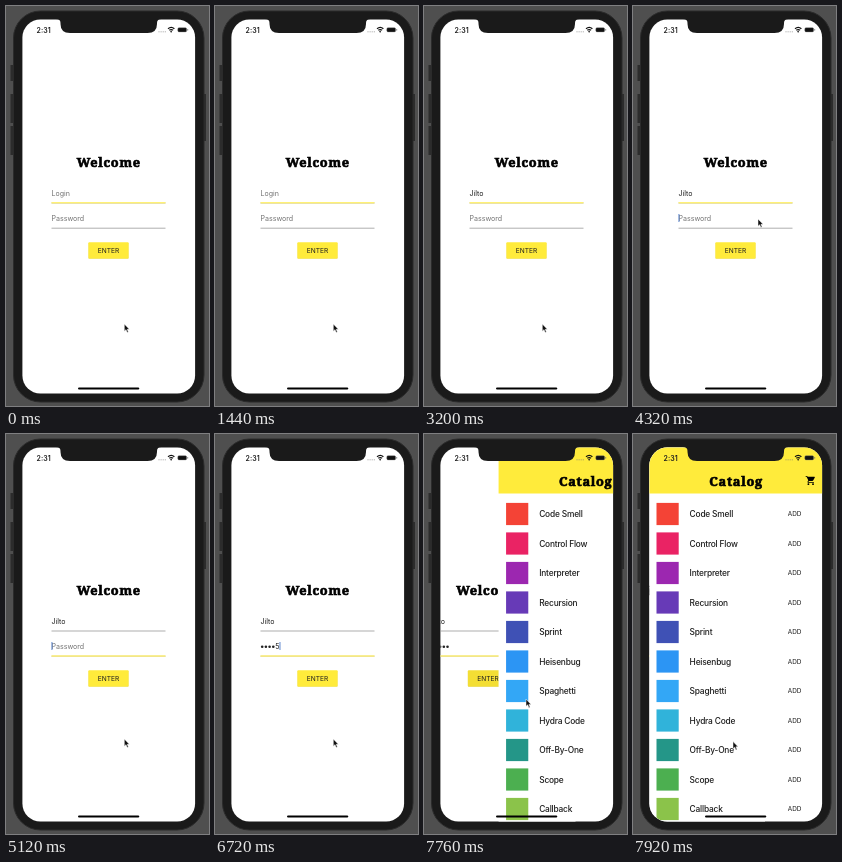
Write an HTML page that moves like this. It is 203 px wide and 400 px high and loops after 8 s.

```html
<!DOCTYPE html>
<html lang="en">
<head>
<meta charset="utf-8">
<title>Sign in</title>
<style>
  html, body { margin: 0; width: 100%; height: 100%; overflow: hidden; background: #4f4f4f; }
  svg { display: block; width: 203px; height: 400px; }
  text { font-family: Inter, Roboto, sans-serif; fill: #1e1e1e; }
  .title { font: 900 12.8px "Noto Serif", serif; letter-spacing: .7px; fill: #000; stroke: #000; stroke-width: .65px; text-anchor: middle; }
  .field { font-size: 7.1px; }
  .hint { font-size: 7.05px; fill: #727272; }
  .item { font-size: 8.4px; font-weight: 500; letter-spacing: -.2px; }
  .add { font-size: 6.4px; }
  .button { font-size: 6.6px; text-anchor: middle; }
</style>
</head>
<body>
<svg viewBox="0 0 203 400">
  <defs>
    <clipPath id="screen"><rect x="16.4" y="13.5" width="172.7" height="374.1" rx="18"/></clipPath>
  </defs>
  <path d="M4.5 59h4v16h-4zM4.5 88h4v29h-4zM4.5 120h4v29h-4zM196 88h4v47h-4z" fill="#2c2c2c"/>
  <rect x="7.5" y="5" width="190.5" height="391" rx="27" fill="#1a1a1a" stroke="#2b2b2b"/>

  <g clip-path="url(#screen)">
    <g id="login">
      <rect x="16" y="13" width="174" height="375" fill="#fff"/>
      <text class="title" x="102.7" y="160.7">Welcome</text>
      <text class="hint" id="loginHint" x="45.5" y="190">Login</text>
      <text class="field" id="name" x="45.5" y="190"></text>
      <path d="M45.5 197h114" stroke="#8c8c8c" stroke-width=".7"/>
      <path id="loginLine" d="M45.5 196.8h114" stroke="#fff176" stroke-width="1.4"/>
      <text class="hint" id="passHint" x="45.5" y="215">Password</text>
      <g id="dots"></g>
      <text class="field" id="digit" y="215"></text>
      <path d="M45.5 222.2h114" stroke="#8c8c8c" stroke-width=".7"/>
      <path id="passLine" d="M45.5 222h114" stroke="#fff176" stroke-width="1.4"/>
      <rect id="caret" width=".9" height="8" fill="#4a78c8"/>
      <rect x="82.3" y="237" width="40.4" height="16" rx="1" fill="#000" opacity=".1"/>
      <rect id="button" x="82.3" y="236.3" width="40.4" height="16.4" rx="1"/>
      <text class="button" x="102.5" y="246.9">ENTER</text>
    </g>
    <g id="catalog">
      <rect x="16" y="13" width="174" height="375" fill="#fff"/>
      <rect x="16" y="13" width="174" height="46.5" fill="#ffeb3b"/>
      <text class="title" x="103.1" y="51.7">Catalog</text>
      <path transform="translate(172.2 41) scale(.46)" d="M7 18c-1.1 0-2 .9-2 2s.9 2 2 2 2-.9 2-2-.9-2-2-2zM1 2v2h2l3.6 7.6-1.35 2.45C4.6 15.3 5.5 17 7 17h12v-2H7.4c-.2 0-.3-.2-.2-.4l.9-1.6h7.45c.75 0 1.4-.4 1.75-1l3.6-6.5c.3-.7-.1-1.5-.9-1.5H5.2l-.95-2zM17 18c-1.1 0-2 .9-2 2s.9 2 2 2 2-.9 2-2-.9-2-2-2z"/>
    </g>
    <text x="30.6" y="26.5" font-size="7" font-weight="600">2:31</text>
    <path d="M152.5 25.8h7.5" stroke="#777" stroke-width="1" stroke-dasharray="1 1.1" opacity=".7"/>
    <g fill="none" stroke="#111" stroke-width="1.2">
      <path d="M162 22.7q3.2-2.8 6.4 0M163.3 24.3q1.9-1.6 3.8 0"/>
      <circle cx="165.2" cy="25.5" r=".3"/>
    </g>
    <rect x="171.8" y="21.7" width="8.8" height="4.2" rx="1.2" fill="#111" stroke="#777" stroke-width=".4"/>
    <path d="M181.7 23v1.6" stroke="#777" stroke-width=".8"/>
    <rect x="72" y="381.4" width="61.3" height="2.2" rx="1.1"/>
  </g>
  <path d="M50 13q4.5 0 4.5 4v1q0 9 9.5 9h77.5q9.5 0 9.5-9v-1q0-4 4.5-4z" fill="#1a1a1a"/>
  <path id="mouse" d="M0 0v7.2l1.7-1.5 1.2 2.8 1.2-.5-1.2-2.7h2.2z" fill="#111" stroke="#fff" stroke-width=".5"/>
</svg>
<script>
const $ = id => document.getElementById(id);
const LOOP = 8000, STEP = 80, LEFT = 45.5, DOT = 3.7;
const NAME = "Jilto", NAME_TIMES = [2320, 2720, 2880, 3040, 3200];
const DIGITS = "12345", DIGIT_TIMES = [5600, 5760, 5920, 6160, 6400];
const FOCUS = 4320, MASK = 7120, PRESS = 7600;
const mouseKeys = [[3680, 118.3, 318], [4160, 125, 213], [4320, 125, 213], [4880, 118.3, 305],
  [6720, 118.3, 305], [7440, 102.7, 250.3], [7680, 102.7, 250.3], [7920, 100, 307.5]];
const items = [["Code Smell", "#f44336"], ["Control Flow", "#ea2364"], ["Interpreter", "#9c27b0"],
  ["Recursion", "#673ab7"], ["Sprint", "#3f51b5"], ["Heisenbug", "#2c95f4"], ["Spaghetti", "#33a7f6"],
  ["Hydra Code", "#30b3da"], ["Off-By-One", "#249688"], ["Scope", "#4caf50"], ["Callback", "#8bc34a"]];

$("catalog").innerHTML += items.map(([label, color], i) => {
  const y = 80 + i * 29.5;
  return `<rect x="23.5" y="${y - 11.1}" width="22.2" height="22.2" fill="${color}"/>
    <text class="item" x="56.6" y="${y + 3}">${label}</text>
    <text class="add" x="154.8" y="${y + 2.2}">ADD</text>`;
}).join("");
$("dots").innerHTML = [...DIGITS].map((_, i) =>
  `<circle cx="${LEFT + 1.7 + i * DOT}" cy="212.8" r="1.3" fill="#222"/>`).join("");

const clamp = v => Math.min(1, Math.max(0, v));
const typed = (times, t) => times.filter(time => t >= time).length;
const show = (id, on) => $(id).setAttribute("opacity", +on);
const move = (id, x, y = 0) => $(id).setAttribute("transform", `translate(${x} ${y})`);

function mouseAt(t) {
  let [, x, y] = mouseKeys[0];
  for (let i = 1; i < mouseKeys.length; i++) {
    const [start, x0, y0] = mouseKeys[i - 1], [end, x1, y1] = mouseKeys[i];
    if (t < start) break;
    const p = clamp((t - start) / (end - start)), e = p * p * (3 - 2 * p);
    x = x0 + (x1 - x0) * e;
    y = y0 + (y1 - y0) * e;
  }
  return [x, y];
}

function draw(t) {
  const letters = typed(NAME_TIMES, t), digits = typed(DIGIT_TIMES, t);
  const inPassword = t >= FOCUS, masked = t >= MASK;
  const focus = clamp((t - FOCUS) / 200);

  $("name").textContent = NAME.slice(0, letters);
  show("loginHint", !letters);
  show("passHint", !digits);
  show("loginLine", 1 - focus);
  show("passLine", focus);

  const dotCount = masked ? digits : Math.max(0, digits - 1);
  [...$("dots").children].forEach((dot, i) => dot.setAttribute("opacity", +(i < dotCount)));
  const digit = $("digit");
  digit.textContent = masked ? "" : DIGITS.slice(dotCount, digits);
  digit.setAttribute("x", LEFT + dotCount * DOT);

  // The caret toggles every 400 ms and restarts when the password gets focus.
  const blink = inPassword ? Math.floor((t - FOCUS) / 400) % 2 === 0 : Math.floor((t + 160) / 400) % 2 === 1;
  const caretX = inPassword
    ? LEFT + dotCount * DOT + digit.getComputedTextLength()
    : LEFT + $("name").getComputedTextLength();
  move("caret", caretX, inPassword ? 208 : 183);
  show("caret", blink && !masked);

  $("button").setAttribute("fill", t >= PRESS ? "#f3de34" : "#ffeb3b");
  const slide = 1 - (1 - clamp((t - 7690) / 230)) ** 3;
  move("login", -58 * slide);
  move("catalog", 174 * (1 - slide));
  move("mouse", ...mouseAt(t));
}

function tick() {
  const t = performance.now() % LOOP;
  draw(Math.floor(t / STEP) * STEP);
  requestAnimationFrame(tick);
}
tick();
</script>
</body>
</html>
```
